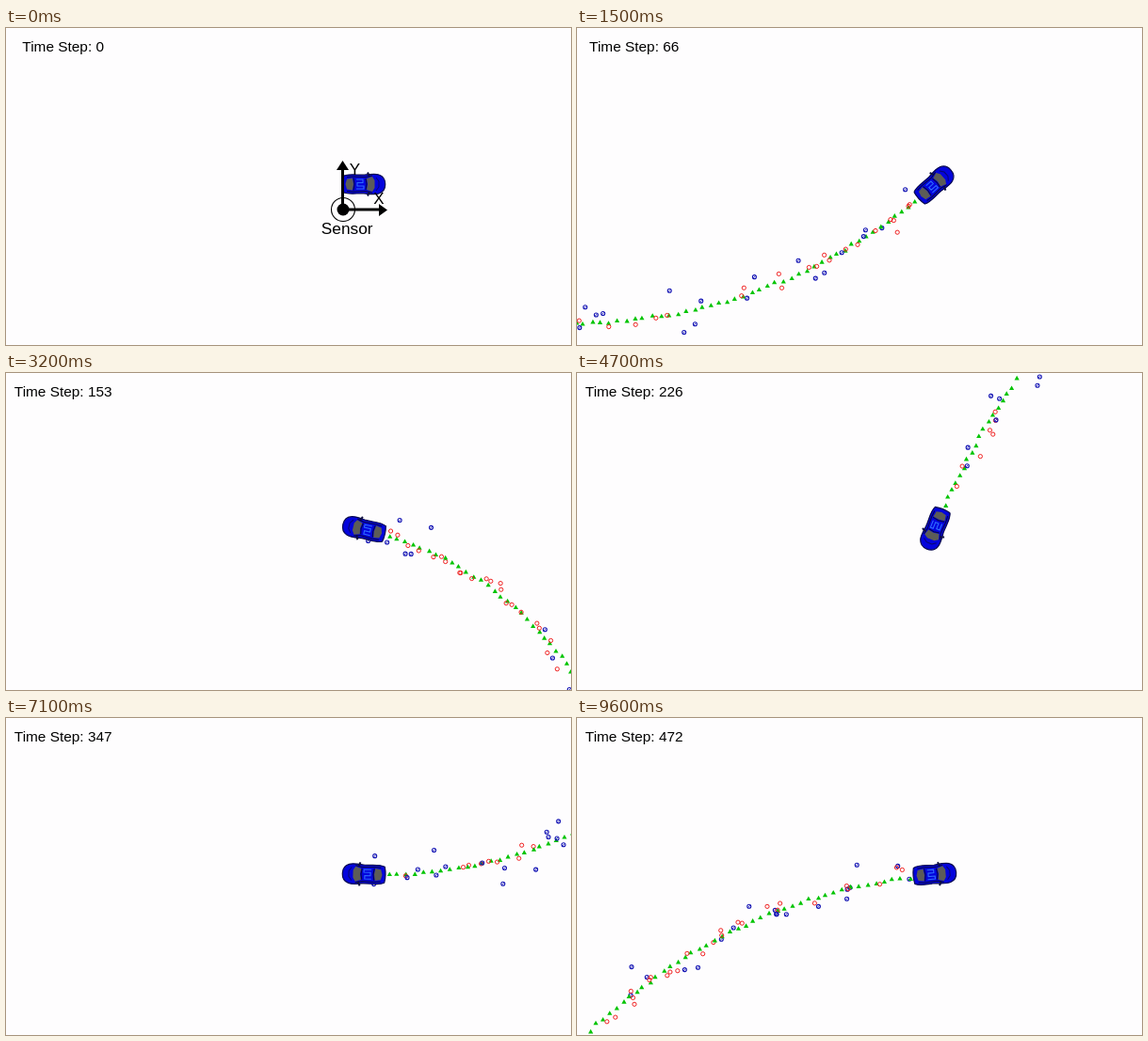
An HTML page with a canvas that plays this animation: 600 px wide and 337 px high, repeating every 9.7 s.

```html
<!DOCTYPE html>
<html lang="en">
<head>
<meta charset="utf-8">
<title>Vehicle tracking</title>
<style>
  html, body { margin: 0; width: 100%; height: 100%; overflow: hidden; background: #fefdfe; }
  canvas { display: block; width: 600px; height: 337px; }
</style>
</head>
<body>
<canvas id="stage" width="600" height="337"></canvas>
<script>
const ctx = document.getElementById('stage').getContext('2d');
const LOOP = 9700, LAST = 472, SPEED = 9.1;
const CAR = { x: 380, y: 166 };
const FONT = '"Liberation Sans", Arial, sans-serif';

// Tick of the display -> simulation step
const TICKS = [[0, 0], [1, 1], [14, 66], [31, 153], [46, 226], [58, 286], [82, 408], [95, LAST]];

// Simulation step -> heading in degrees, counter-clockwise
const HEADINGS = [
  [0, 0], [22, 2], [66, 42], [123, 124], [153, 167], [205, 234], [226, 248],
  [265, 248], [286, 242], [383, 140], [390, 103], [408, 76], [427, 44], [LAST, 5]
];

function lerp(table, v) {
  const i = Math.max(1, table.findIndex(([a]) => v <= a));
  const [a, p] = table[i - 1], [b, q] = table[i];
  return p + (q - p) * (v - a) / (b - a);
}

let seed = 20;
function rand() {
  seed = (seed * 1664525 + 1013904223) % 4294967296;
  return seed / 4294967296;
}
// Roughly normal noise with deviation s
const noise = s => (rand() + rand() + rand() - 1.5) * 2 * s;

const heading = step => lerp(HEADINGS, step) * Math.PI / 180;

// Path in stage pixels, starting at the car's first place
const path = [{ x: 0, y: 0 }];
for (let s = 1; s <= LAST; s++) {
  const a = heading(s - 0.5), p = path[s - 1];
  path.push({ x: p.x + SPEED * Math.cos(a), y: p.y - SPEED * Math.sin(a) });
}

const marks = [];
function addMark(step, kind, s) {
  const p = path[step];
  marks.push({ step, kind, x: p.x + noise(s), y: p.y + noise(s) });
}
for (let s = 1; s <= LAST; s++) {
  addMark(s, 'track', 0.8);
  if (rand() < 0.5) addMark(s, 'red', 5);
  if (rand() < 0.44) addMark(s, 'blue', 13);
}

function poly(points, fill) {
  ctx.beginPath();
  points.forEach(([x, y]) => ctx.lineTo(x, y));
  ctx.closePath();
  ctx.fillStyle = fill;
  ctx.fill();
}

function line(color, width, ...points) {
  ctx.beginPath();
  points.forEach(([x, y]) => ctx.lineTo(x, y));
  ctx.strokeStyle = color;
  ctx.lineWidth = width;
  ctx.stroke();
}

function ring(x, y, r, color, width) {
  ctx.beginPath();
  ctx.arc(x, y, r, 0, 7);
  ctx.strokeStyle = color;
  ctx.lineWidth = width;
  ctx.stroke();
}

function text(str, x, y, size) {
  ctx.font = `${size}px ${FONT}`;
  ctx.textAlign = 'center';
  ctx.fillStyle = '#000';
  ctx.fillText(str, x, y);
}

const drawMark = {
  track: (x, y) => poly([[x, y - 2.5], [x + 2.6, y + 2.1], [x - 2.6, y + 2.1]], '#00c400'),
  red: (x, y) => ring(x, y, 2.1, '#f02020', 1),
  blue(x, y) {
    ring(x, y, 2, '#1414b4', 1.1);
    line('#1414b4', 0.8, [x - 1.4, y + 1.4], [x + 1.4, y - 1.4]);
  }
};

function drawSensor(x, y) {
  ring(x, y, 12.5, '#000', 1.1);
  ctx.beginPath();
  ctx.arc(x, y, 6.5, 0, 7);
  ctx.fillStyle = '#000';
  ctx.fill();
  line('#000', 3, [x - 0.5, y - 43], [x - 0.5, y], [x + 40, y]);
  poly([[x + 47, y + 0.5], [x + 38, y - 6], [x + 38, y + 7]], '#000');
  poly([[x - 0.5, y - 52], [x - 7, y - 42], [x + 6, y - 42]], '#000');
  text('Y', x + 12.5, y - 37, 17);
  text('X', x + 38, y - 6, 17);
  text('Sensor', x + 4.2, y + 26, 17.3);
}

function drawCar(angle) {
  ctx.save();
  ctx.translate(CAR.x, CAR.y);
  ctx.rotate(-angle);
  ctx.beginPath();
  ctx.moveTo(-22, -8.5);
  ctx.bezierCurveTo(-16, -11.5, -8, -9.5, 0, -9.8);
  ctx.bezierCurveTo(6, -10.5, 12, -11.5, 16, -10);
  ctx.bezierCurveTo(25, -7, 25, 7, 16, 10);
  ctx.bezierCurveTo(12, 11.5, 6, 10.5, 0, 9.8);
  ctx.bezierCurveTo(-8, 9.5, -16, 11.5, -22, 8.5);
  ctx.quadraticCurveTo(-24, 0, -22, -8.5);
  ctx.fillStyle = '#0404dc';
  ctx.fill();
  ctx.strokeStyle = '#080850';
  ctx.lineWidth = 1.2;
  ctx.stroke();
  // Windows
  poly([[-18, -5.5], [-12, -6.5], [-11, 0], [-12, 6.5], [-18, 5.5], [-19.5, 0]], '#5c5c58');
  poly([[3, -6], [9, -8], [11.5, -4], [11.5, 4], [9, 8], [3, 6], [4, 0]], '#5c5c58');
  // Mirrors and pillars on both sides
  for (const k of [-1, 1]) {
    line('#101040', 2, [4, 12.5 * k], [6, 8 * k]);
    line('#080840', 1, [-18, 7.5 * k], [-11, 8 * k], [2, 7.5 * k], [9, 9 * k]);
  }
  line('#080840', 1, [-11, -6.5], [-10, 0], [-11, 6.5]);
  line('#080840', 1, [2, -6], [3, 0], [2, 6]);
  // Roof and bonnet lines
  line('#2f6cff', 1.1, [-8, -5], [-1, -5], [-1, -1.5], [-7, -1.5], [-7, 2], [0, 2], [0, 5], [-8, 5]);
  line('#080870', 1, [13, -7], [16, -3], [16, 3], [13, 7]);
  ctx.restore();
}

function draw(t) {
  const tick = t < 200 ? 0 : 1 + Math.floor((t - 200) / 100);
  const step = Math.round(lerp(TICKS, tick));
  const dx = CAR.x - path[step].x, dy = CAR.y - path[step].y;

  ctx.fillStyle = '#fefdfe';
  ctx.fillRect(0, 0, 600, 337);
  for (const m of marks) {
    if (m.step <= step) drawMark[m.kind](m.x + dx, m.y + dy);
  }
  drawCar(heading(step));
  drawSensor(dx - 22, dy + 27);
  text(`Time Step: ${step}`, 60.7, 24.6, 15.4);
}

const begin = performance.now();
function loop() {
  draw((performance.now() - begin) % LOOP);
  requestAnimationFrame(loop);
}
loop();
</script>
</body>
</html>
```
